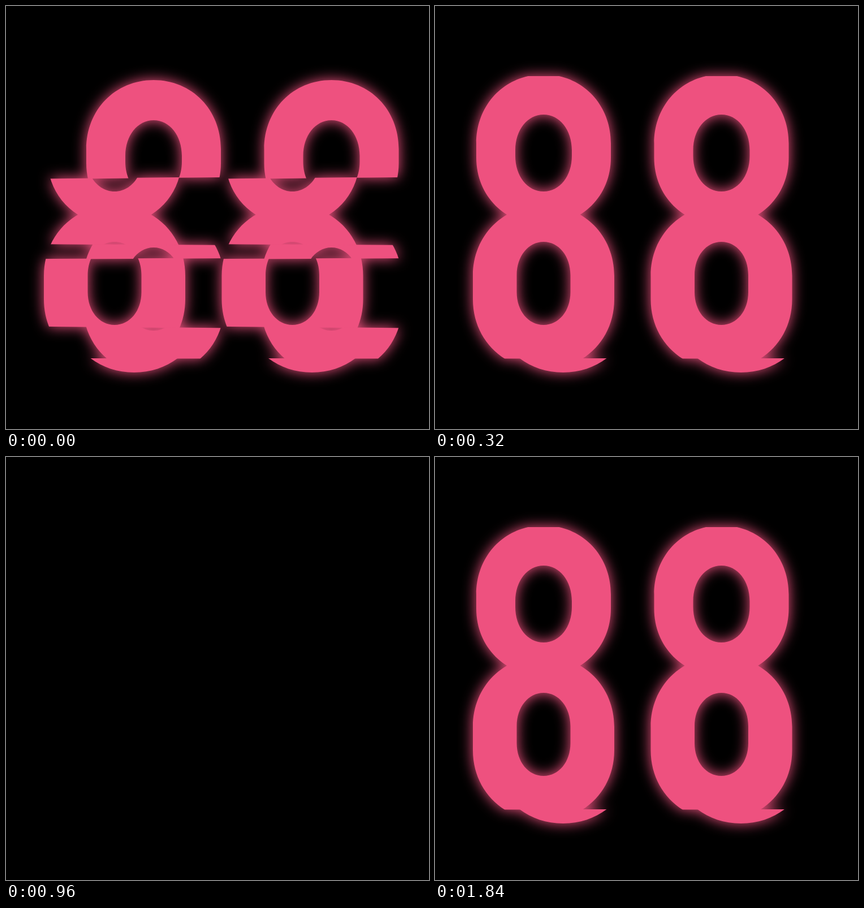
An HTML page with a canvas that plays this animation: 748 by 748 pixels, repeating every 1880 ms.

```html
<!DOCTYPE html>
<html lang="en">
<head>
<meta charset="utf-8">
<title>Glitching 88</title>
<style>
  html, body { margin: 0; width: 100%; height: 100%; overflow: hidden; background: #000; }
  canvas { display: block; width: 100%; height: 100%; }
</style>
</head>
<body>
<canvas id="stage" width="748" height="748" role="img" aria-label="88"></canvas>
<script>
const SIZE = 748, STEP = 40, LOOP = 1880;
const PINK = '#ee517f';
const ROW = 24.4;            // height of one glitch row
const TOP = 124, FOOT = 623; // upper crop, and start of the fixed foot slice
const DIGITS = [0, 314.5];
const SLOPE = 0.145;         // vertical drift per horizontal pixel

// Runs of 40 ms poses: [first row of the resting window, slide in px].
// The window climbs three rows per pose, then the digits rest for one.
const REST = [0, 0];
const RUNS = [
  { start: 0, poses: [[7, 69], [4, 69], [1, 69], REST, [8, 69], [5, 69],
                      [2, 69], REST, REST, [13, 45], [10, 57]] },
  { start: 800, poses: [[9, 57], [6, 63], [3, 69], REST] },
  { start: 1640, poses: [[6, 40], [3, 57], REST, [6, 57], [3, 63], REST] }
];

const ctx = document.getElementById('stage').getContext('2d');
const layer = document.createElement('canvas');
layer.width = layer.height = SIZE;
const ink = layer.getContext('2d');

// Rounded bowl; a negative half width reverses the winding to cut a hole.
function addBowl(path, cx, half, top, upper, lower, bottom) {
  const k = 0.57, kx = half * k;
  const up = (upper - top) * k, down = (bottom - lower) * k;
  path.moveTo(cx - half, upper);
  path.bezierCurveTo(cx - half, upper - up, cx - kx, top, cx, top);
  path.bezierCurveTo(cx + kx, top, cx + half, upper - up, cx + half, upper);
  path.lineTo(cx + half, lower);
  path.bezierCurveTo(cx + half, lower + down, cx + kx, bottom, cx, bottom);
  path.bezierCurveTo(cx - kx, bottom, cx - half, lower + down, cx - half, lower);
  path.closePath();
}

const eight = new Path2D();
addBowl(eight, 192, 119, 121, 243, 268, 387);
addBowl(eight, 192, -50, 192, 255, 265, 328);
addBowl(eight, 192, 125, 352, 477, 518.5, 643);
addBowl(eight, 192, -47.5, 417, 476, 506, 564);

// Draws the part of a digit between two edges { y, tilt }, moved by dx, dy.
function drawSlice(x, from, to, dx, dy) {
  const left = x + 40, right = x + 420;
  ink.save();
  ink.beginPath();
  ink.moveTo(left, from.y - from.tilt);
  ink.lineTo(right, from.y + from.tilt);
  ink.lineTo(right, to.y + to.tilt + 0.6);
  ink.lineTo(left, to.y - to.tilt + 0.6);
  ink.clip();
  ink.translate(x + dx, dy);
  ink.fill(eight);
  ink.restore();
}

const edge = (y, tilt = 0) =>
  y >= FOOT ? { y: FOOT, tilt: 0 } : { y: Math.max(y, TOP), tilt };

function edgesFor(row) {
  const shift = (row - 5) * ROW;
  return [
    edge(TOP),
    edge(255 + shift, -2),
    edge(373 + shift, 1.3),
    edge(397.5 + shift, -1),
    edge(519 + shift, 2),
    edge(FOOT)
  ];
}

function drawPose([row, slide]) {
  ink.clearRect(0, 0, SIZE, SIZE);
  ink.fillStyle = PINK;
  const edges = slide ? edgesFor(row) : [edge(TOP), edge(FOOT)];
  for (const x of DIGITS) {
    for (let i = 0; i < edges.length - 1; i++) {
      if (edges[i].y >= edges[i + 1].y) continue;
      const dx = i % 2 || !slide ? 0 : slide;
      drawSlice(x, edges[i], edges[i + 1], dx, dx * SLOPE);
    }
    drawSlice(x, edge(FOOT), { y: 700, tilt: 0 }, 34.5, 5);
  }
  ctx.save();
  ctx.shadowColor = PINK;
  ctx.shadowBlur = 24;
  ctx.drawImage(layer, 0, 0);
  ctx.restore();
}

function poseAt(time) {
  for (const { start, poses } of RUNS) {
    const index = Math.floor((time - start) / STEP);
    if (index >= 0 && index < poses.length) return poses[index];
  }
  return null;
}

const began = performance.now();
let shown;

function frame() {
  const pose = poseAt((performance.now() - began) % LOOP);
  if (pose !== shown) {
    shown = pose;
    ctx.fillStyle = '#000';
    ctx.fillRect(0, 0, SIZE, SIZE);
    if (pose) drawPose(pose);
  }
  requestAnimationFrame(frame);
}
frame();
</script>
</body>
</html>
```
